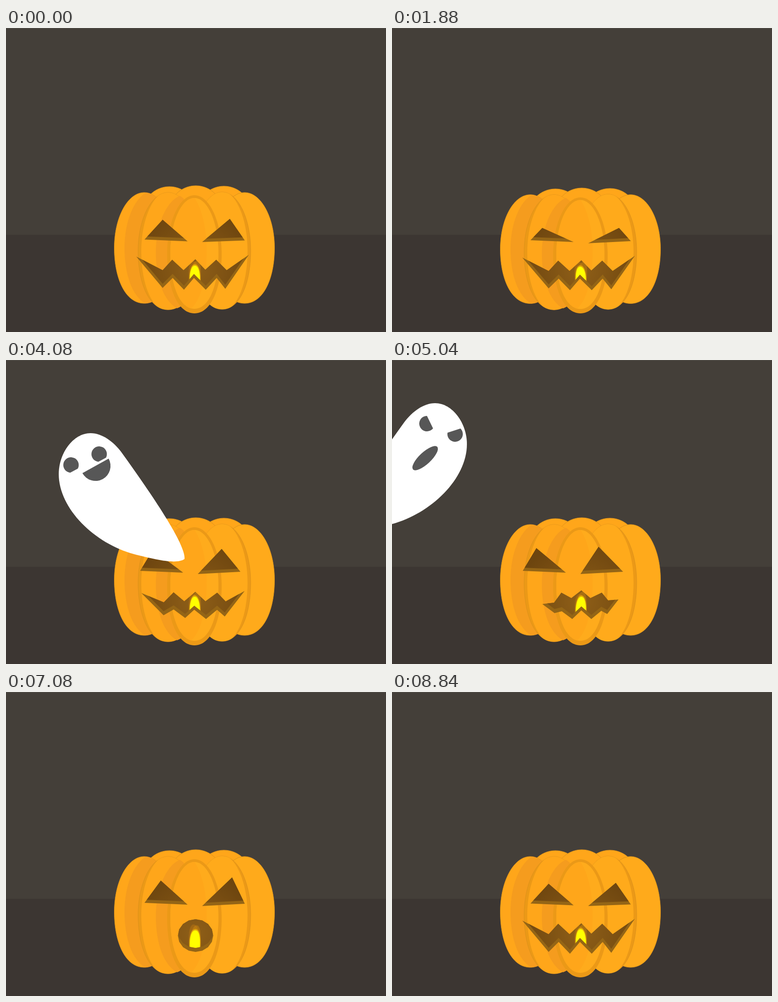
An HTML page with a canvas for the animation above (8.88 s loop, 837 by 669 pixels).

```html
<!DOCTYPE html>
<html lang="en">
<head>
<meta charset="utf-8">
<title>Pumpkin and ghost</title>
<style>
html, body { margin: 0; width: 100%; height: 100%; overflow: hidden; background: #443f39; }
canvas { display: block; }
</style>
</head>
<body>
<canvas id="stage" width="837" height="669"></canvas>
<script>
const ctx = document.getElementById('stage').getContext('2d');
const LOOP = 8880, STEP = 40, TAU = Math.PI * 2, DEG = Math.PI / 180;

// Mouth outlines: nine points along the top, then seven back along the bottom.
const grin = [287,503, 345,533, 366,510, 391,533, 417,509, 439,532, 463,510, 486,533, 535,499,
  483,574, 464,550, 440,576, 414,550, 392,576, 367,550, 345,572];
const smirk = [289,506, 345,533, 368,511, 392,533, 417,511, 440,533, 466,512, 486,532, 533,503,
  484,566, 466,549, 441,570, 414,549, 394,567, 368,548, 344,563];
const worry = [331,537, 357,534, 373,512, 395,524, 417,507, 437,524, 462,512, 476,529, 499,527,
  474,559, 461,552, 439,570, 417,551, 397,570, 374,553, 358,557];
const gasp = Array.from({ length: 16 }, (_, i) => {
  const a = Math.PI + i * TAU / 16;
  return [417.5 + 39 * Math.cos(a), 536 + 36 * Math.sin(a)];
}).flat();

const mouthKeys = [[0, grin], [2760, grin], [3440, smirk], [3900, smirk], [4500, worry],
  [5100, worry], [5640, gasp], [7400, gasp], [8300, grin]];

// Eye pose: left peak x, y, right peak x, y, sideways shift, drop of the base.
const calm = [345, 422, 493, 420, 0, 1.5];
const squint = [331, 436.5, 500, 436.5, 0, 0];
const glare = [330, 424, 501, 422, 0, 0];
const lookLeft = [318, 414, 455, 411, -17, 0];
const lookRight = [375, 411, 509, 405, 0, 0];
const settle = [341, 415, 498, 408, 0, 0];
const eyeKeys = [[0, calm], [400, squint], [2500, squint], [3000, glare], [3700, glare],
  [4400, lookLeft], [5150, lookLeft], [5800, lookRight], [6300, lookRight],
  [7000, settle], [7400, settle], [8300, calm]];

function pose(keys, t) {
  let i = keys.length - 1;
  while (keys[i][0] > t) i--;
  const [t0, a] = keys[i], next = keys[i + 1];
  if (!next) return a;
  const u = (t - t0) / (next[0] - t0), k = u * u * (3 - 2 * u);
  return a.map((v, j) => v + (next[1][j] - v) * k);
}

// An oval with a slightly fuller lower half.
function oval(x, y, rx, ry) {
  const k = .5523, full = .63;
  ctx.beginPath();
  ctx.moveTo(x - rx, y);
  ctx.bezierCurveTo(x - rx, y - ry * k, x - rx * k, y - ry, x, y - ry);
  ctx.bezierCurveTo(x + rx * k, y - ry, x + rx, y - ry * k, x + rx, y);
  ctx.bezierCurveTo(x + rx, y + ry * k, x + rx * full, y + ry, x, y + ry);
  ctx.bezierCurveTo(x - rx * full, y + ry, x - rx, y + ry * k, x - rx, y);
  ctx.closePath();
}

function lobe(x, y, rx, ry, fill, line) {
  oval(x, y, rx, ry);
  ctx.fillStyle = fill;
  ctx.fill();
  if (line) {
    ctx.strokeStyle = line;
    ctx.lineWidth = 1;
    ctx.stroke();
  }
}

// Paints a second oval inside the current path only.
function tint(...args) {
  ctx.save();
  ctx.clip();
  lobe(...args);
  ctx.restore();
}

function polygon(p) {
  const path = new Path2D();
  for (let i = 0; i < p.length; i += 2) path.lineTo(p[i], p[i + 1]);
  path.closePath();
  return path;
}

// A hole in the skin: pale lip below, dark inside above it.
function carve(points, lip, inside) {
  const hole = polygon(points);
  ctx.save();
  ctx.fillStyle = '#946516';
  ctx.fill(hole);
  ctx.clip(hole);
  ctx.translate(0, -lip);
  const dark = ctx.createRadialGradient(416, 540, 15, 416, 540, 140);
  dark.addColorStop(0, '#8b5c17');
  dark.addColorStop(1, '#6d450f');
  ctx.fillStyle = dark;
  ctx.fill(hole);
  if (inside) {
    ctx.clip(hole);
    ctx.translate(0, lip);
    inside();
  }
  ctx.restore();
}

function tongue(x, top, half, color) {
  ctx.beginPath();
  ctx.moveTo(416 - half, 564);
  ctx.bezierCurveTo(416 - half - 2, 540, x - half * .8, top, x, top);
  ctx.bezierCurveTo(x + half * .8, top, 416 + half + 2, 540, 416 + half, 564);
  ctx.fillStyle = color;
  ctx.fill();
}

function flame(t) {
  const a = t / LOOP * TAU, sway = 1.5 * Math.sin(a * 13), lift = 2 * Math.sin(a * 19);
  tongue(412 + sway, 513 - lift, 13, 'rgba(225,140,15,.25)');
  tongue(421 - sway, 512 + lift, 12, 'rgba(235,155,10,.3)');
  tongue(416 + sway, 520 + lift, 12, 'rgba(255,205,0,.6)');
  tongue(416 + sway, 523 + lift, 10.5, '#ffff00');
}

function pumpkin(t) {
  const bounce = t < 2733 ? .018 * Math.sin(t / 683.6 * TAU) : 0;
  const rim = '#eb9917', edge = '#dc911b', skin = '#ffa61a', shade = '#f59c1e', bright = '#ffaa1b';
  ctx.save();
  ctx.translate(0, 628);
  ctx.scale(1, 1 + bounce);
  ctx.translate(0, -628);

  for (const [x, y] of [[360, 349], [480, 348], [418, 347]]) lobe(x, y + 60, 60, 60, skin, edge);
  lobe(304.5, 484, 66, 122, skin, edge);
  tint(329, 484, 68, 128, shade);
  lobe(525.5, 484, 66, 122, bright, edge);

  lobe(357, 491, 66, 129, rim, edge);
  tint(363, 491, 65, 135, skin);
  oval(363, 491, 65, 128);
  tint(398, 494, 68, 128, shade);
  lobe(476, 490, 63, 129, rim, edge);
  tint(469, 490, 63, 135, bright);

  lobe(415, 498, 60, 130, rim);
  lobe(415, 496, 53, 122, '#ffab1c');
  tint(386, 490, 56, 136, skin);

  const [lx, ly, rx, ry, dx, drop] = pose(eyeKeys, t);
  carve([lx, ly, 305 + dx, 464 + drop, 400 + dx, 468 + drop], 7);
  carve([rx, ry, 526 + dx, 466 + drop, 432 + dx, 471], 7);
  carve(pose(mouthKeys, t), 9, () => flame(t));
  ctx.restore();
}

const body = new Path2D('M95 95C133 95 165 139 165 185C165 262 85 338 0 361' +
  'C-50 374-95 384-112 372C-115 340-40 230 27 137C45 113 70 95 95 95Z');

function arc(x, y, r, from, to) {
  ctx.beginPath();
  ctx.arc(x, y, r, from * DEG, to * DEG);
  ctx.fill();
}

function ghost(t) {
  if (t < 3300 || t > 6000) return;
  const angry = t > 4700;
  ctx.save();
  if (angry) {
    const s = t - 5040;
    ctx.translate(s * 1.027, -s * .133);
  } else {
    const s = t - 3440;
    ctx.translate(934 - s * 1.02, 284 - .4 * s + 9.3e-5 * s * s);
    ctx.scale(-1, 1);
  }
  ctx.fillStyle = '#fff';
  ctx.fill(body);
  ctx.fillStyle = '#575757';
  if (angry) {
    arc(77, 140, 17, 38, 270);
    arc(139, 163, 17, -46, 190);
    ctx.beginPath();
    ctx.ellipse(73, 216, 36.5, 13, -43 * DEG, 0, TAU);
    ctx.fill();
  } else {
    arc(76, 141, 17, 152, 444);
    arc(138, 165, 17, 152, 444);
    arc(84, 167, 33, 29, 209);
  }
  ctx.restore();
}

function frame(now) {
  const t = Math.floor(now % LOOP / STEP) * STEP;
  ctx.fillStyle = '#443f39';
  ctx.fillRect(0, 0, 837, 669);
  ctx.fillStyle = '#3c3632';
  ctx.fillRect(0, 455, 837, 214);
  ctx.fillStyle = '#55514b';
  ctx.fillRect(0, 0, 837, 1);
  pumpkin(t);
  ghost(t);
  requestAnimationFrame(frame);
}
requestAnimationFrame(frame);
</script>
</body>
</html>
```
